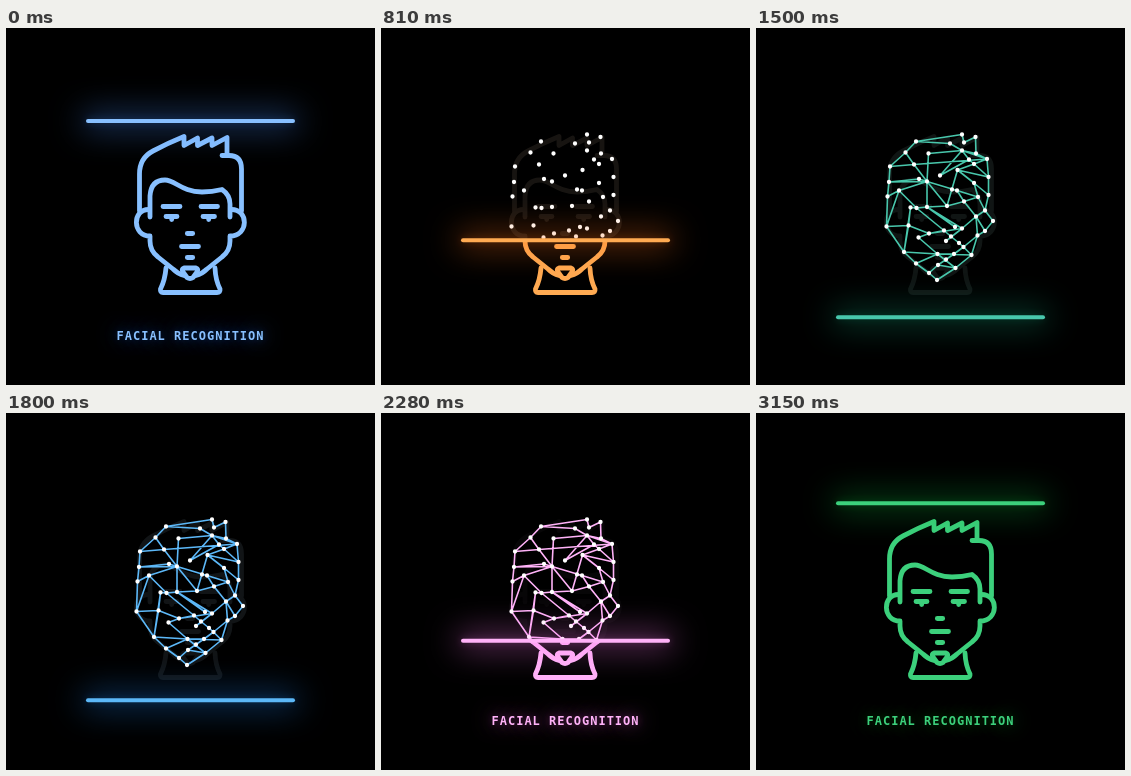
An HTML page that plays this animation: 369 by 357 pixels, repeating every 3180 ms.

```html
<!DOCTYPE html>
<html lang="en">
<head>
<meta charset="utf-8">
<title>Facial recognition</title>
<style>
  html, body { margin: 0; width: 100%; height: 100%; overflow: hidden; background: #000; }
  #stage { position: relative; width: 369px; height: 357px; overflow: hidden; background: #000; }
  svg { position: absolute; left: 0; top: 0; }
  #bar { position: absolute; left: 80px; top: 0; width: 209px; height: 3.6px; border-radius: 2px; }
  #label {
    position: absolute; left: 110.5px; top: 301px; line-height: 14px; white-space: nowrap;
    font: bold 12px/14px "DejaVu Sans Mono", monospace; letter-spacing: 1px;
  }
  .face { fill: none; stroke-width: 4.8; stroke-linecap: round; stroke-linejoin: round; }
</style>
</head>
<body>
<div id="stage">
  <svg width="369" height="357" viewBox="0 0 369 357">
    <defs>
      <clipPath id="below"><rect id="belowBox" width="369" height="357"/></clipPath>
      <clipPath id="above"><rect id="aboveBox" width="369" height="0"/></clipPath>
      <clipPath id="drawn"><rect id="drawnBox" width="369" height="0"/></clipPath>
      <linearGradient id="tint" gradientUnits="userSpaceOnUse" x1="0" x2="0">
        <stop id="tintA" offset="0"/><stop id="tintB" offset="1"/>
      </linearGradient>
      <g id="head">
        <!-- hair -->
        <path d="M133.5 183V146Q133.5 130 147 123Q162 115 178 108.5V117.5L191.5 110V117.5L206 110V117.5L221 109.5V127.5"/>
        <path d="M216 127.5H223Q235.5 127.5 235.5 141V183"/>
        <path d="M144 189V168Q145 152 159 152C169 152 176 164 196 164Q206 164 216 161.5Q224 167 224 176V189"/>
        <!-- ears and jaw -->
        <path d="M143 181.5C126 181 126 208 144 208V213Q144 223 152 229L167 241Q172 246 178 247.5"/>
        <path d="M225 181.5C243 181 243 208 224 208V213Q224 223 216 229L201 241Q196 246 190 247.5"/>
        <!-- brows, eyes, nose, mouth -->
        <path d="M157 178.5H174M195 178.5H211.5M160 188.5H171M197 188.5H208.5M165.7 190.5V191.5M202.7 190.5V191.5"/>
        <path d="M181.3 205.5H186.7M175.5 218.5H192.5M181.3 229.5H186.7"/>
        <!-- beard and neck -->
        <path d="M178 240H190Q193 241 191 244L187 249.5Q184 251.5 181 249.5L177 244Q175 241 178 240Z"/>
        <path d="M160 240Q159 252 154.5 261Q154 264.5 157 264.5H211Q214.5 264.5 214 261Q209.5 252 209 240"/>
      </g>
    </defs>
    <g clip-path="url(#above)"><use id="ghost" href="#head" class="face"/></g>
    <g clip-path="url(#below)"><use id="face" href="#head" class="face"/></g>
    <g clip-path="url(#above)">
      <g clip-path="url(#drawn)"><path id="mesh" fill="none" stroke="url(#tint)" stroke-width="1.6" stroke-linejoin="round"/></g>
      <path id="dots" stroke="#fff" stroke-width="4.3" stroke-linecap="round"/>
    </g>
  </svg>
  <div id="bar"></div>
  <div id="label">FACIAL RECOGNITION</div>
</div>
<script>
const LOOP = 3180, STEP = 30, HUE_LOOP = 1840;
const el = id => document.getElementById(id);

const points = [
  [206,106.5],[219.5,109],[208,114.5],[194,115.5],[160,113.5],[149.5,124.5],[172.5,125.5],[206,122.5],
  [220,125.5],[231,131],[213,131.5],[218,136],[134,138.5],[158,136.5],[201.5,142],[184,147.5],
  [232.5,149],[133,154],[163,151],[171,153.5],[218,155],[196,161.5],[201,162.5],[143,162.5],
  [131.5,168.5],[222,169],[232.5,167],[208,173.5],[191,178],[154.5,179.5],[160.5,180],[171,179],
  [229,182.5],[220,188.5],[237,193],[130.5,198.5],[152.5,197.5],[199,199],[206,200.5],[229,203],
  [188,202.5],[173,205.5],[162.5,209.5],[195,208.5],[190,213],[221.5,207.5],[203,215],[207.5,219],
  [148,224],[181.5,226],[198,226],[215.5,227],[190,231.5],[160,235.5],[182,237],[199.5,240],
  [173,245],[181,252]
];

// Each chain joins points by index.
const outline = [
  [4,0,2,1,8,9,16,26,32,34,39,45,51,55,57,56,53,48,35,24,17,12,5,4,3,7,9]
];
const upper = [
  [12,13,9], [5,13,19,6,7,15], [7,10,11,9], [8,7], [10,16], [17,18,19,17], [24,23,19,28,14,16],
  [15,10], [14,11], [14,20,26], [20,25,32], [19,22,25,27,28,31,19], [21,22,27], [23,35]
];
const lower = [
  [23,30], [29,30,31,38,33,32], [29,36,48], [29,48], [35,36,41], [27,33,39], [30,40,43,46,47,51],
  [31,37], [42,41,38,44], [33,45], [41,40], [42,49,51], [48,49,50,52,54,55], [49,55], [54,56],
  [47,50], [45,47], [53,49]
];

const at = i => points[i].join(" ");
el("mesh").setAttribute("d",
  [...outline, ...upper, ...lower].map(c => "M" + c.map(at).join("L")).join(""));
el("dots").setAttribute("d", points.map(p => `M${p.join(" ")}h.01`).join(""));

const hues = [
  [0, [136,192,255]], [440, [255,178,248]], [820, [255,170,77]], [1200, [108,210,60]],
  [1310, [60,208,124]], [1800, [92,184,248]], [HUE_LOOP, [136,192,255]]
];
// Phase of the sweep; it rests at the bottom.
const sweep = [
  [0,.28], [810,1.803], [1200,2.587], [1465,Math.PI], [1715,Math.PI],
  [1800,3.342], [2280,4.317], [2670,5.059], [3150,6.142], [LOOP,6.21]
];
const fade = [[0,.11], [1800,.1], [2500,0], [LOOP,0]];
const labelOn = [[0,330], [2190,2490], [2880,LOOP]];

function lookup(table, t) {
  let i = 1;
  while (i < table.length - 1 && t > table[i][0]) i++;
  const [t0, a] = table[i - 1], [t1, b] = table[i];
  const k = Math.min(1, Math.max(0, (t - t0) / (t1 - t0)));
  return Array.isArray(a) ? a.map((v, n) => v + (b[n] - v) * k) : a + (b - a) * k;
}

const hueAt = t => lookup(hues, (t + HUE_LOOP) % HUE_LOOP);
const rgb = (c, alpha = 1) => `rgba(${c.map(Math.round).join(",")},${alpha})`;

function draw(t) {
  const y = 189 - 100 * Math.cos(lookup(sweep, t));
  const hue = hueAt(t), color = rgb(hue);
  const glow = hue.map(v => v * v / 255);

  el("belowBox").setAttribute("y", y);
  el("aboveBox").setAttribute("height", y);
  el("face").style.stroke = color;
  el("ghost").style.stroke = rgb(hue.map(v => (v + 400) / 3));
  el("ghost").style.opacity = lookup(fade, t);

  // The mesh is drawn downwards, its leading edge ahead in hue.
  const edge = 105 + (t - 850) * .32;
  el("drawnBox").setAttribute("height", Math.max(0, edge));
  el("tint").setAttribute("y1", edge - 42);
  el("tint").setAttribute("y2", edge - 18);
  el("tintA").setAttribute("stop-color", rgb(hueAt(t < 1400 ? t - 40 : t)));
  el("tintB").setAttribute("stop-color", rgb(hueAt(t + 220)));

  const bar = el("bar").style;
  bar.transform = `translateY(${y - 1.8}px)`;
  bar.background = color;
  bar.boxShadow = `0 0 32px 4px ${rgb(glow, .6)}, 0 0 8px ${rgb(glow, .3)}`;

  const label = el("label").style;
  label.visibility = labelOn.some(([a, b]) => t >= a && t < b) ? "visible" : "hidden";
  label.color = color;
  label.textShadow = `0 0 20px ${rgb(glow, .7)}, 0 0 9px ${rgb(glow, .25)}`;
}

const start = performance.now();
function tick() {
  const t = (performance.now() - start) % LOOP;
  draw(Math.floor(t / STEP) * STEP);
  requestAnimationFrame(tick);
}
draw(0);
requestAnimationFrame(tick);
</script>
</body>
</html>
```
